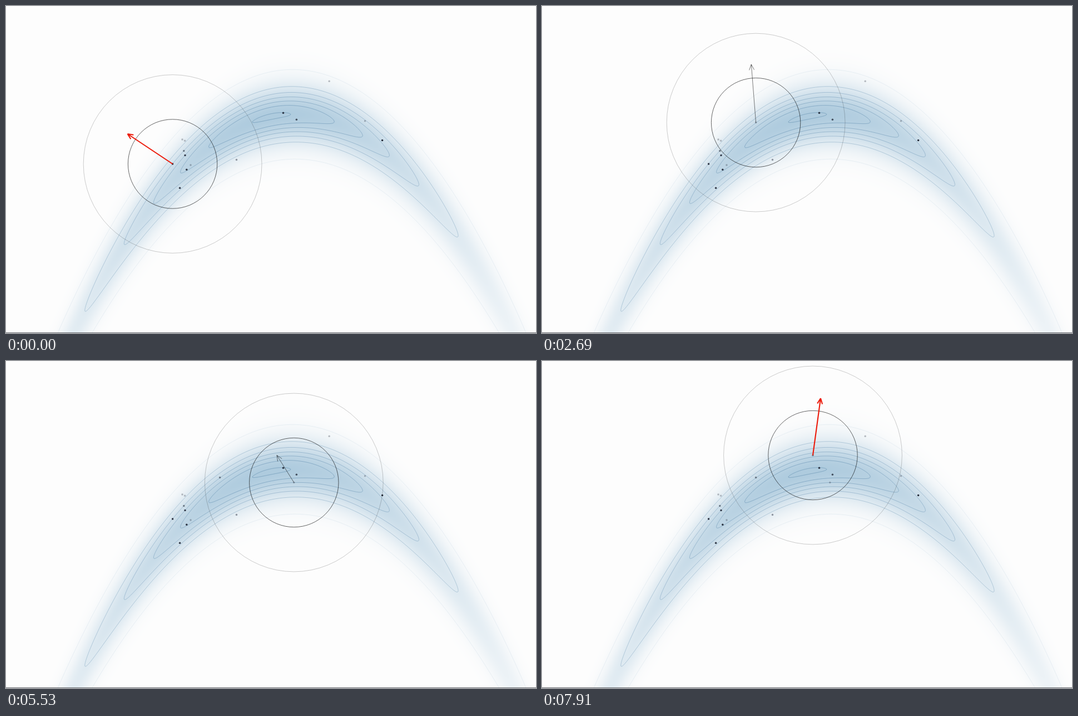
Animation, 953 px wide and 588 px high, one loop 8000 ms. Source, as an HTML page with a canvas:

```html
<!DOCTYPE html>
<html lang="en">
<head>
<meta charset="utf-8">
<title>Random walk sampler</title>
<style>
  html, body { margin: 0; width: 100%; height: 100%; overflow: hidden; background: #fdfdfd; }
  canvas { display: block; }
</style>
</head>
<body>
<canvas id="stage" width="953" height="588"></canvas>
<script>
const W = 953, H = 588, LOOP = 8000;
const SCALE = 80.1, CX = 477.4, CY = 294.9, RADIUS = 80.2;
const BEND = 0.2, RHO = 0.8, SPREAD = Math.sqrt(1 - RHO * RHO);
const PAPER = [253, 253, 253], PEAK = [174, 203, 222];
const VERDICT_DELAY = 980;

const ctx = document.getElementById('stage').getContext('2d');

// Each walk step: start time, current point, proposed point, accepted or not
const steps = [
  { at: -1090, from: [299.6, 284], to: [218.5, 230], ok: false },
  { at: 450, from: [299.6, 284], to: [384.6, 209.6], ok: true },
  { at: 1990, from: [384.6, 209.6], to: [376.3, 105], ok: false },
  { at: 3530, from: [384.6, 209.6], to: [517.8, 218.5], ok: true },
  { at: 5070, from: [517.8, 218.5], to: [487, 169.5], ok: true },
  { at: 6610, from: [487, 169.5], to: [501, 67], ok: false }
];

// Samples already on the stage: x, y, opacity
const samples = [
  [299.6, 284, 0.85], [322, 268.6, 0.8], [324.8, 294.2, 0.85], [312.6, 327.3, 0.85],
  [498.5, 192.3, 0.85], [676.6, 241.5, 0.9], [522.4, 204.2, 0.7], [319.8, 260.4, 0.5],
  [317, 240, 0.28], [321.6, 242.2, 0.25], [332, 286, 0.28], [414.5, 276.6, 0.42],
  [581.2, 135.3, 0.27], [645.5, 206.8, 0.28]
];

function layer() {
  const c = document.createElement('canvas');
  c.width = W;
  c.height = H;
  return c;
}

// Squared distance from the centre of the bent normal distribution
function distance2(px, py) {
  const x = (px - CX) / SCALE, y = (CY - py) / SCALE;
  const u = x / 2;
  const v = 2 * (y - 1.2 + BEND * x * x);
  const w = (v - RHO * u) / SPREAD;
  return u * u + w * w;
}

function paintDensity(g) {
  const img = g.createImageData(W, H);
  for (let y = 0, i = 0; y < H; y++) {
    for (let x = 0; x < W; x++, i += 4) {
      const d = Math.exp(-0.22 * distance2(x + 0.5, y + 0.5));
      for (let c = 0; c < 3; c++) img.data[i + c] = PAPER[c] + (PEAK[c] - PAPER[c]) * d;
      img.data[i + 3] = 255;
    }
  }
  g.putImageData(img, 0, 0);
}

function paintContour(g, level, alpha) {
  const k = Math.sqrt(-2.5 * Math.log(level)), n = 600;
  g.beginPath();
  for (let i = 0; i < n; i++) {
    const a = i / n * 2 * Math.PI;
    const x = 2 * k * Math.cos(a);
    const y = 1.2 + k * (RHO * Math.cos(a) + SPREAD * Math.sin(a)) / 2 - BEND * x * x;
    g.lineTo(CX + x * SCALE, CY - y * SCALE);
  }
  g.closePath();
  g.strokeStyle = `rgba(70,120,160,${alpha})`;
  g.lineWidth = 0.9;
  g.stroke();
}

function buildBackdrop() {
  const c = layer(), g = c.getContext('2d');
  paintDensity(g);
  for (let i = 0; i < 7; i++) paintContour(g, 0.011 + 0.1618 * i, i ? 0.31 + 0.03 * i : 0.1);
  g.fillStyle = '#6c6e72';
  g.fillRect(0, 587, W, 1);
  return c;
}

function circle([x, y], r, color) {
  ctx.beginPath();
  ctx.arc(x, y, r, 0, 2 * Math.PI);
  ctx.strokeStyle = color;
  ctx.lineWidth = 1;
  ctx.stroke();
}

function dot(x, y, alpha) {
  ctx.beginPath();
  ctx.arc(x, y, 1.75, 0, 2 * Math.PI);
  ctx.fillStyle = `rgba(20,25,40,${alpha})`;
  ctx.fill();
}

function arrow([x1, y1], [x2, y2], color, width) {
  const dir = Math.atan2(y2 - y1, x2 - x1), head = 11;
  ctx.beginPath();
  ctx.moveTo(x1, y1);
  ctx.lineTo(x2, y2);
  for (const side of [-1, 1]) {
    const a = dir + Math.PI + side * 0.42;
    ctx.moveTo(x2, y2);
    ctx.lineTo(x2 + head * Math.cos(a), y2 + head * Math.sin(a));
  }
  ctx.strokeStyle = color;
  ctx.lineWidth = width;
  ctx.stroke();
}

const backdrop = buildBackdrop();

function draw(t) {
  ctx.drawImage(backdrop, 0, 0);
  for (const s of samples) dot(...s);

  // Every verdict after the first adds a dot where the walk then stands
  for (const s of steps.slice(1)) {
    if (t >= s.at + VERDICT_DELAY) dot(...(s.ok ? s.to : s.from), 0.28);
  }

  const step = steps.filter(s => t >= s.at).pop();
  circle(step.from, 2 * RADIUS, 'rgba(0,0,0,0.2)');
  circle(step.from, RADIUS, 'rgba(0,0,0,0.6)');

  if (t < step.at + VERDICT_DELAY) arrow(step.from, step.to, 'rgba(0,0,0,0.52)', 1);
  else arrow(step.from, step.to, step.ok ? '#1c922c' : '#ec1c0c', 2.1);
}

const start = performance.now();
function tick() {
  draw((performance.now() - start) % LOOP);
  requestAnimationFrame(tick);
}
tick();
</script>
</body>
</html>
```
